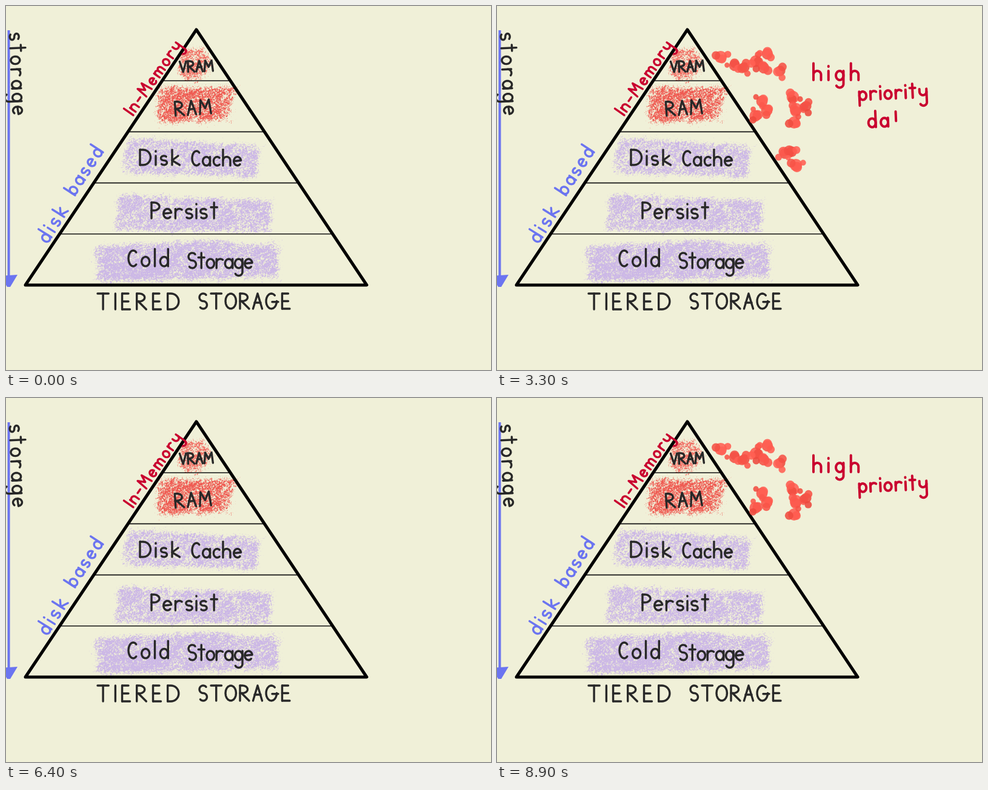
An HTML page with a canvas for the animation above (8.95 s loop, 800 by 600 pixels).

```html
<!DOCTYPE html>
<html lang="en">
<head>
<meta charset="utf-8">
<title>Tiered storage</title>
<style>
html, body { margin: 0; width: 100%; height: 100%; overflow: hidden; background: #f0f0d8; }
canvas { display: block; width: 800px; height: 600px; }
</style>
</head>
<body>
<canvas id="stage" width="800" height="600" role="img" aria-label="Tiered storage pyramid: VRAM, RAM, Disk Cache, Persist, Cold Storage"></canvas>
<script>
const W = 800, H = 600, LOOP = 8950, CLEAR = 6110, STEP = 50;
const PAPER = '#f0f0d8', INK = '#282828', RED = '#c9002f', BLUE = '#6b74f0';
const ctx = document.getElementById('stage').getContext('2d');

// Pen strokes: x to the right, y up from the baseline; x-height 6, capitals 10.
const arc = (cx, cy, rx, ry, from, to) => Array.from({ length: 19 }, (_, i) => {
  const a = (from + (to - from) * i / 18) * Math.PI / 180;
  return [cx + rx * Math.cos(a), cy + ry * Math.sin(a)];
});
const stem = (top, foot = 0, x = 0) => [[x, top], [x, foot]];
const bar = (y, x0, x1) => [[x0, y], [x1, y]];
const zigzag = (xs, ys) => xs.map((x, i) => [x, ys[i]]);
const arch = (x, w) => [...arc(x + w / 2, 3.5, w / 2, 2.5, 180, 0), [x + w, 0]];
const ring = (w, h) => arc(w / 2, h / 2, w / 2, h / 2, 100, 460);
const open = (w, h, to = 310) => arc(w / 2, h / 2, w / 2, h / 2, 50, to);
const snake = (w, h) => [...arc(w / 2, h * 0.75, w / 2, h / 4, 40, 270),
  ...arc(w / 2, h / 4, w / 2, h / 4, 90, -140)];
const tail = y => [[5, 6], ...arc(2.5, y, 2.5, 2.5, 0, -150)];
const half = (w, mid, ry) => [[0, mid + ry], ...arc(w * 0.3, mid, w * 0.7, ry, 90, -90), [0, mid - ry]];
const bowl = arc(2.5, 3, 2.5, 3, 45, 405), belly = arc(2.5, 3, 2.5, 3, 160, -200);

const GLYPHS = {
  a: [bowl, stem(6, 0, 5)],
  b: [stem(10), belly],
  c: [open(5, 6)],
  d: [bowl, stem(11, 0, 5)],
  e: [[[0, 3], ...arc(2.5, 3, 2.5, 3, 10, 315)]],
  g: [bowl, tail(-2.5)],
  h: [stem(11), arch(0, 5)],
  i: [stem(6), stem(9.2, 8.8)],
  k: [stem(10), zigzag([4, 0, 5], [6, 3, 0])],
  l: [stem(11)],
  m: [stem(6), arch(0, 4), arch(4, 4)],
  n: [stem(6), arch(0, 5)],
  o: [ring(5, 6)],
  p: [stem(6, -4), belly],
  r: [stem(6), arc(2.5, 3.5, 2.5, 2.5, 180, 50)],
  s: [snake(4, 6)],
  t: [stem(10, 0, 2), bar(7, 0, 4)],
  w: [zigzag([0, 1.5, 3.5, 5, 7], [6, 0, 4, 0, 6])],
  y: [[[0, 6], ...arc(2.5, 4, 2.5, 2.5, 180, 360)], tail(-3.5)],
  '-': [bar(4, 0, 4)],
  A: [zigzag([0, 3, 6], [0, 10, 0]), bar(4, 1, 5)],
  C: [open(6, 10)],
  D: [stem(10), half(7, 5, 5)],
  E: [stem(10), bar(10, 0, 4), bar(5, 0, 4), bar(0, 0, 5)],
  G: [open(7, 10, 360), bar(4.5, 4, 8)],
  I: [stem(10)],
  M: [zigzag([0, 1, 4, 7, 8], [0, 10, 4, 10, 0])],
  O: [ring(7, 10)],
  P: [stem(10), half(5, 7.5, 2.5)],
  R: [stem(10), half(5, 7.5, 2.5), zigzag([1, 6], [5, 0])],
  S: [snake(5, 10)],
  T: [stem(10, 0, 3.5), bar(10, 0, 7)],
  V: [zigzag([0, 3, 6], [10, 0, 10])]
};

// Turns a word into pen lines on the stage.
function word(text, x, y, size, gap, deg, color, start = 0, end = 0, pen = 3.4) {
  const rad = deg * Math.PI / 180, cos = Math.cos(rad), sin = Math.sin(rad);
  const lines = [];
  let left = 0, total = 0;
  for (const ch of text) {
    let wide = 0;
    for (const raw of GLYPHS[ch]) {
      wide = Math.max(wide, ...raw.map(p => p[0]));
      const pts = raw.map(([px, py]) => {
        const u = (left + px) * size, v = -py * size;
        return [x + u * cos - v * sin, y + u * sin + v * cos];
      });
      for (let i = 1; i < pts.length; i++)
        total += Math.hypot(pts[i][0] - pts[i - 1][0], pts[i][1] - pts[i - 1][1]);
      lines.push(pts);
    }
    left += wide + gap;
  }
  return { lines, total, color, start, end, pen };
}

function drawWord(g, w, part) {
  let rest = w.total * part;
  g.strokeStyle = w.color;
  g.lineWidth = w.pen;
  g.lineCap = g.lineJoin = 'round';
  for (const pts of w.lines) {
    if (rest <= 0) return;
    g.beginPath();
    g.moveTo(...pts[0]);
    for (let i = 1; i < pts.length && rest > 0; i++) {
      const [ax, ay] = pts[i - 1], [bx, by] = pts[i];
      const len = Math.hypot(bx - ax, by - ay), k = Math.min(1, rest / (len || 1));
      g.lineTo(ax + (bx - ax) * k, ay + (by - ay) * k);
      rest -= len;
    }
    g.stroke();
  }
}

const labels = [
  word('VRAM', 287, 109, 1.75, 1.7, -2, INK),
  word('RAM', 280, 181, 2.3, 2.7, -4, INK),
  word('Disk', 221, 262, 2.5, 3.4, 0, INK),
  word('Cache', 307, 263, 2.4, 2.4, 0, INK),
  word('Persist', 240, 350, 2.6, 2.6, 0, INK),
  word('Cold', 202, 429, 2.6, 3.4, 0, INK),
  word('Storage', 301, 432, 2.5, 1.5, 0, INK),
  word('TIERED', 151, 500, 2.6, 4.3, 0, INK),
  word('STORAGE', 319, 499, 2.5, 2.6, 0, INK),
  word('storage', 6, 46, 2.5, 3.5, 87.5, INK),
  word('In-Memory', 210, 180, 1.9, 3.6, -55, RED),
  word('disk', 69, 391, 2.3, 4.4, -58, BLUE),
  word('based', 114, 312, 2.2, 3.6, -57, BLUE)
];

const notes = [
  word('high', 522, 122, 2.5, 4.9, 0, RED, 1250, 1710, 4),
  word('priority', 598, 155, 2.3, 3, -2.5, RED, 1730, 2790, 4),
  word('data', 613, 200, 2.4, 3.5, -2.5, RED, 2830, 3550, 4),
  word('low', 713, 347, 2.5, 4, 0, BLUE, 3660, 3950, 4),
  word('p', 791, 348, 2.9, 0, 0, BLUE, 3980, 4090, 4)
];

function hash(x, y) {
  let h = Math.imul(x, 374761393) + Math.imul(y, 668265263);
  h = Math.imul(h ^ (h >>> 13), 1274126177);
  return ((h ^ (h >>> 16)) >>> 0) / 4294967296;
}
function noise(x, y) {
  const ix = Math.floor(x), iy = Math.floor(y), fx = x - ix, fy = y - iy;
  const top = hash(ix, iy) * (1 - fx) + hash(ix + 1, iy) * fx;
  const low = hash(ix, iy + 1) * (1 - fx) + hash(ix + 1, iy + 1) * fx;
  return top * (1 - fy) + low * fy;
}

// Paint dabs: around each key point four dots spiral outwards and shrink.
const HOT = [236, 72, 60], COLD = [203, 181, 230], DABS = 4;
function spatter(rgb, start, end, keys) {
  const dots = keys.split(' ').flatMap(key => {
    const [kx, ky] = key.split(',').map(Number);
    return Array.from({ length: DABS }, (_, i) => {
      const turn = 2.4 * i + 6.3 * hash(kx, ky), away = 4.2 * i;
      return {
        x: kx + away * Math.cos(turn), y: ky + away * Math.sin(turn) * 0.9,
        r: 8.5 - 1.5 * i + 2 * hash(kx + i, ky), lift: 26 * hash(kx, ky + i)
      };
    });
  });
  return { rgb, start, end, dots };
}
const clusters = [
  spatter(HOT, 1050, 1780, '369,84 392,98 408,101 427,91 446,79 440,102 467,107'),
  spatter(HOT, 1830, 2530, '426,181 437,157 445,172 488,150 493,170 510,165 490,192'),
  spatter(HOT, 2850, 3300, '475,243 486,240 493,262'),
  spatter(COLD, 3300, 3900, '519,237 533,254 553,257 569,249'),
  spatter(COLD, 3930, 4800, '517,315 540,307 525,338 535,346 567,335 588,334 612,313 617,340 641,313 654,337 666,314'),
  spatter(COLD, 4850, 5500, '592,410 625,405 632,426 678,425 688,433 715,438')
];

function drawSpatter(c, part) {
  const n = Math.floor(c.dots.length * part + 1e-6);
  for (const { x, y, r, lift } of c.dots.slice(0, n)) {
    const k = c.rgb === HOT ? lift : lift / 5;
    ctx.fillStyle = `rgba(${c.rgb.map(v => v + k)},0.88)`;
    ctx.beginPath();
    ctx.arc(x, y, r, 0, 7);
    ctx.fill();
  }
}

const layer = () => Object.assign(document.createElement('canvas'), { width: W, height: H });

// Crayon patch: a soft outline broken up by slanted grain.
function crayon(g, path, rgb, cover) {
  const cv = layer(), m = cv.getContext('2d', { willReadFrequently: true });
  m.filter = 'blur(4px)';
  m.fill(new Path2D(path));
  const img = m.getImageData(0, 0, W, H), d = img.data;
  for (let y = 55; y < 465; y++) for (let x = 135; x < 465; x++) {
    const i = (y * W + x) * 4;
    if (!d[i + 3]) continue;
    const u = x * 0.8 - y * 0.6, v = x * 0.6 + y * 0.8;
    const grain = 0.2 * noise(u / 5, v / 2) + 0.6 * noise(x / 1.4, y / 1.4) + 0.2 * noise(u / 20, v / 8);
    const k = (cover - grain - (1 - d[i + 3] / 255) * 0.5) * 3.2 + 0.5;
    rgb.forEach((c, j) => { d[i + j] = c; });
    d[i + 3] = 245 * Math.max(0, Math.min(1, k));
  }
  m.putImageData(img, 0, 0);
  g.drawImage(cv, 0, 0);
}

function line(g, pts, width, color) {
  g.beginPath();
  pts.forEach(p => g.lineTo(...p));
  g.lineWidth = width;
  g.strokeStyle = color;
  g.stroke();
}

function makeScene() {
  const cv = layer(), g = cv.getContext('2d');
  g.fillStyle = PAPER;
  g.fillRect(0, 0, W, H);
  const rose = [240, 104, 94], coral = [238, 86, 78], lilac = [202, 181, 230];
  crayon(g, 'M288 72L325 67L345 92L318 127L293 125L278 105Z', rose, 0.52);
  crayon(g, 'M250 133L382 131L368 191L247 193Z', coral, 0.57);
  crayon(g, 'M201 216L419 228L416 284L190 277Z', lilac, 0.57);
  crayon(g, 'M184 309L440 320L437 375L177 372Z', lilac, 0.57);
  crayon(g, 'M147 396L330 385L450 393L447 448L148 456Z', lilac, 0.62);

  for (let i = 1; i < 5; i++) {
    const k = i / 5, y = 39 + 421 * k;
    line(g, [[314 - 282 * k, y], [314 + 281 * k, y]], 1.6, '#151515');
  }
  g.lineJoin = 'round';
  line(g, [[314, 39], [595, 460], [32, 460], [314, 39], [595, 460]], 5, '#000');

  line(g, [[4.5, 40], [4.5, 452]], 4, BLUE);
  g.fillStyle = BLUE;
  g.fill(new Path2D('M-9 445L19 443L7 463L2 463Z'));
  labels.forEach(w => drawWord(g, w, 1));
  return cv;
}

const scene = makeScene();
const progress = (t, o) => Math.max(0, Math.min(1, (t - o.start) / (o.end - o.start)));
const begun = performance.now();

function frame(now) {
  const t = Math.floor((Math.max(0, now - begun) % LOOP) / STEP) * STEP;
  const phase = t % CLEAR;
  ctx.drawImage(scene, 0, 0);
  clusters.forEach(c => drawSpatter(c, progress(phase, c)));
  notes.forEach(w => drawWord(ctx, w, progress(phase, w)));
  requestAnimationFrame(frame);
}
frame(begun);
</script>
</body>
</html>
```
